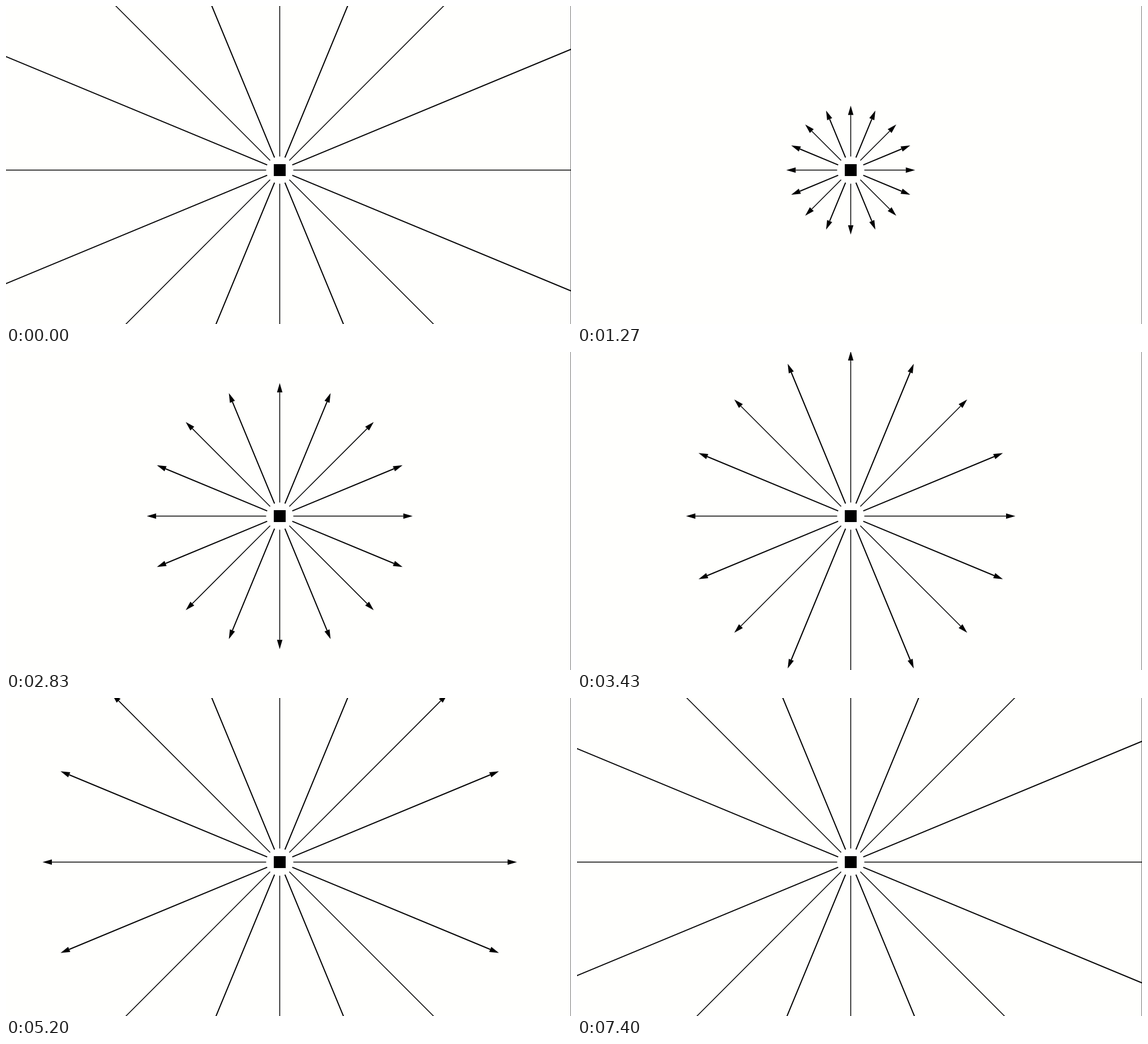
An HTML page with a canvas for the animation above (8430 ms loop, 998 by 561 pixels).

```html
<!DOCTYPE html>
<html lang="en">
<head>
<meta charset="utf-8">
<title>Radiating arrows</title>
<style>
  html, body { margin: 0; width: 100%; height: 100%; overflow: hidden; background: #fffffd; }
  canvas { display: block; }
</style>
</head>
<body>
<canvas id="stage" width="998" height="561"></canvas>
<script>
const ctx = document.getElementById('stage').getContext('2d');
const W = 998, H = 561, CX = 483.5, CY = 289.5;
const LOOP = 8430, STEP = 100 / 3;
const GAP = 24, HEAD = 16.5, HALF = 4.8, SQUARE = 21, ARROWS = 16;

// Distance of the tips from the centre, one key every 26 steps.
const KEY_STEPS = 26;
const KEYS = [24, 75, 159, 213, 294, 371, 419, 489, 560, 680];

function reachAt(step) {
  const position = Math.min(step / KEY_STEPS, KEYS.length - 1.001);
  const i = Math.floor(position);
  return KEYS[i] + (KEYS[i + 1] - KEYS[i]) * (position - i);
}

function drawArrow(index, reach) {
  const tail = Math.max(GAP, reach - HEAD);
  const half = HALF * (reach - tail) / HEAD;
  ctx.save();
  ctx.translate(CX, CY);
  ctx.rotate(index * 2 * Math.PI / ARROWS);
  ctx.lineWidth = index % 2 ? 2 : 1.5;
  ctx.beginPath();
  ctx.moveTo(GAP, 0);
  ctx.lineTo(tail, 0);
  ctx.stroke();
  ctx.beginPath();
  ctx.moveTo(reach, 0);
  ctx.lineTo(tail, -half);
  ctx.lineTo(tail, half);
  ctx.fill();
  ctx.restore();
}

function draw(time) {
  // The loop opens with the fully extended lines for one step.
  const step = Math.floor((time + 5) / STEP) || Infinity;
  const reach = reachAt(step);
  ctx.fillStyle = '#fffffd';
  ctx.fillRect(0, 0, W, H);
  ctx.fillStyle = '#777';
  ctx.fillRect(W - 1, 0, 1, H);
  ctx.fillStyle = ctx.strokeStyle = '#000';
  for (let i = 0; i < ARROWS; i++) drawArrow(i, reach);
  ctx.fillRect(CX - SQUARE / 2, CY - SQUARE / 2, SQUARE, SQUARE);
}

const start = performance.now();
function tick() {
  draw((performance.now() - start) % LOOP);
  requestAnimationFrame(tick);
}
tick();
</script>
</body>
</html>
```
